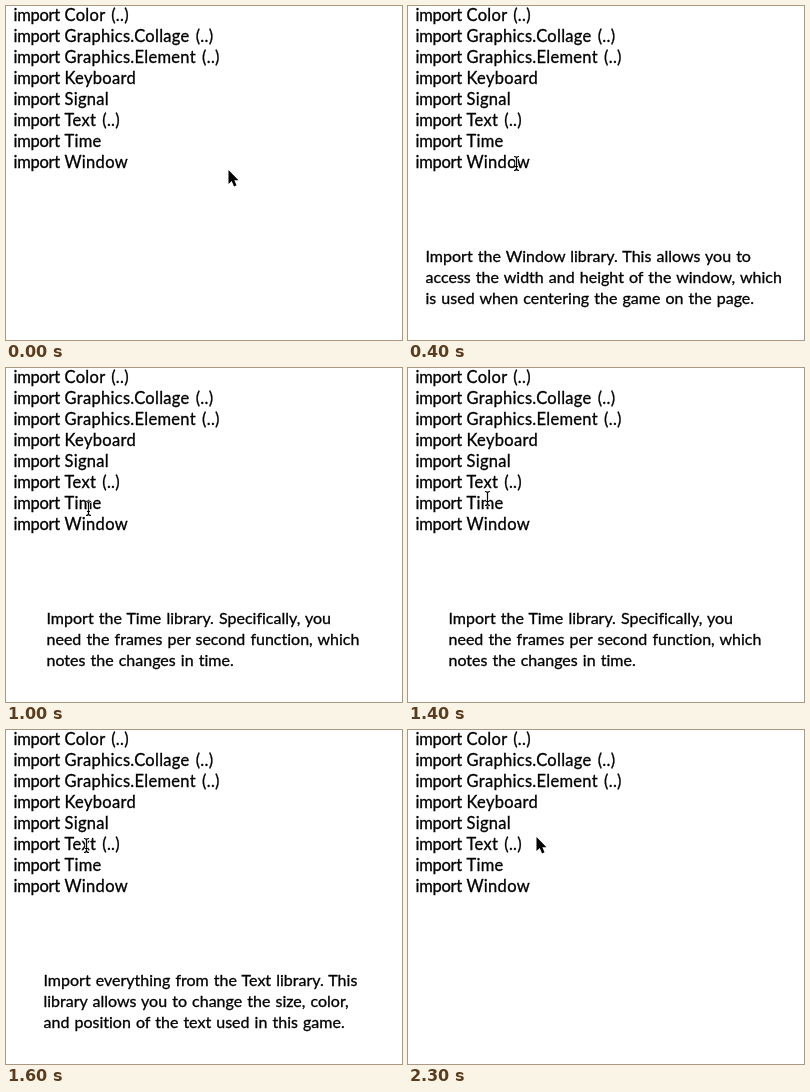
An HTML page for the animation above (2.4 s loop, 396 by 334 pixels).

```html
<!DOCTYPE html>
<html lang="en">
<head>
<meta charset="utf-8">
<title>Import hints</title>
<style>
  html, body { margin: 0; width: 100%; height: 100%; overflow: hidden; background: #fff; }
  svg { display: block; width: 396px; height: 334px; }
  text {
    font: 16px Lato, "Open Sans", sans-serif;
    font-variant-ligatures: none;
    word-spacing: 1px;
    white-space: pre;
    stroke: #000;
    stroke-width: .3px;
  }
  .code { font-size: 16.5px; }
  .word { letter-spacing: -.3px; }
  .name { letter-spacing: .3px; word-spacing: 1.5px; }

  .hint, .arrow, .beam, .cursor { animation: 2400ms step-end infinite; }
  .hint { visibility: hidden; }
  .window { animation-name: window; }
  .time { animation-name: time; }
  .text { animation-name: text; }
  .arrow { animation-name: arrow; }
  .beam { animation-name: beam; }
  .cursor { animation-name: move; }

  @keyframes window { 0%, 41.66%, 100% { visibility: hidden } 12.49% { visibility: visible } }
  @keyframes time { 0%, 62.49%, 100% { visibility: hidden } 41.66% { visibility: visible } }
  @keyframes text { 0%, 95.83%, 100% { visibility: hidden } 62.49% { visibility: visible } }
  @keyframes arrow { 0%, 95.83%, 100% { visibility: visible } 12.49% { visibility: hidden } }
  @keyframes beam { 0%, 95.83%, 100% { visibility: hidden } 12.49% { visibility: visible } }

  /* One pose per 100 ms tick, with pauses over each word */
  @keyframes move {
    0%, 100% { transform: translate(222px, 164px) }
    4.16% { transform: translate(190px, 162px) }
    8.33% { transform: translate(150px, 160px) }
    12.49% { transform: translate(117px, 158px) }
    16.66% { transform: translate(108px, 157px) }
    33.33% { transform: translate(99px, 153px) }
    37.49% { transform: translate(86px, 145px) }
    41.66% { transform: translate(82px, 140px) }
    45.83% { transform: translate(80px, 136px) }
    49.99% { transform: translate(79px, 133px) }
    58.33% { transform: translate(79px, 130px) }
    62.49% { transform: translate(79px, 121px) }
    66.66% { transform: translate(80px, 115px) }
    91.66% { transform: translate(97px, 114px) }
    95.83% { transform: translate(128px, 107px) }
  }
</style>
</head>
<body>
<svg viewBox="0 0 396 334">
  <defs>
    <path id="bar" fill="none"
      d="M-2.5-7Q0-7 0-5Q0-7 2.5-7M0-5V5M-2.5 7Q0 7 0 5Q0 7 2.5 7M-1.5 3H1.5"/>
  </defs>
  <g id="lines"></g>
  <g class="cursor">
    <path class="arrow" d="M.5 0V14L3.7 11L6.1 16.4L8.5 15.3L6.3 10.2H10.5Z"
      stroke="#fff" stroke-width="1.6" stroke-linejoin="round" paint-order="stroke"/>
    <g class="beam" transform="translate(.5 .5)">
      <use href="#bar" stroke="#fff" stroke-width="2.6"/>
      <use href="#bar" stroke="#000" stroke-width="1.2"/>
    </g>
  </g>
</svg>
<script>
  const NS = "http://www.w3.org/2000/svg";
  const PITCH = 21;
  const lines = document.getElementById("lines");

  function add(parent, tag, attrs, content = "") {
    const el = document.createElementNS(NS, tag);
    for (const key in attrs) el.setAttribute(key, attrs[key]);
    el.textContent = content;
    return parent.appendChild(el);
  }

  const modules = [
    "Color (..)", "Graphics.Collage (..)", "Graphics.Element (..)", "Keyboard",
    "Signal", "Text (..)", "Time", "Window"
  ];
  modules.forEach((name, i) => {
    const row = add(lines, "text", { y: 15 + i * PITCH, class: "code" });
    add(row, "tspan", { x: 7.5, class: "word" }, "import");
    add(row, "tspan", { x: 58.5, class: "name" }, name);
  });

  const hints = [
    ["window", 17.5, [
      "Import the Window library. This allows you to",
      "access the width and height of the window, which",
      "is used when centering the game on the page."]],
    ["time", 40.5, [
      "Import the Time library. Specifically, you",
      "need the frames per second function, which",
      "notes the changes in time."]],
    ["text", 37.5, [
      "Import everything from the Text library. This",
      "library allows you to change the size, color,",
      "and position of the text used in this game."]]
  ];
  for (const [name, x, rows] of hints) {
    const group = add(lines, "g", { class: "hint " + name });
    rows.forEach((row, i) => add(group, "text", { x, y: 256 + i * PITCH }, row));
  }
</script>
</body>
</html>
```
